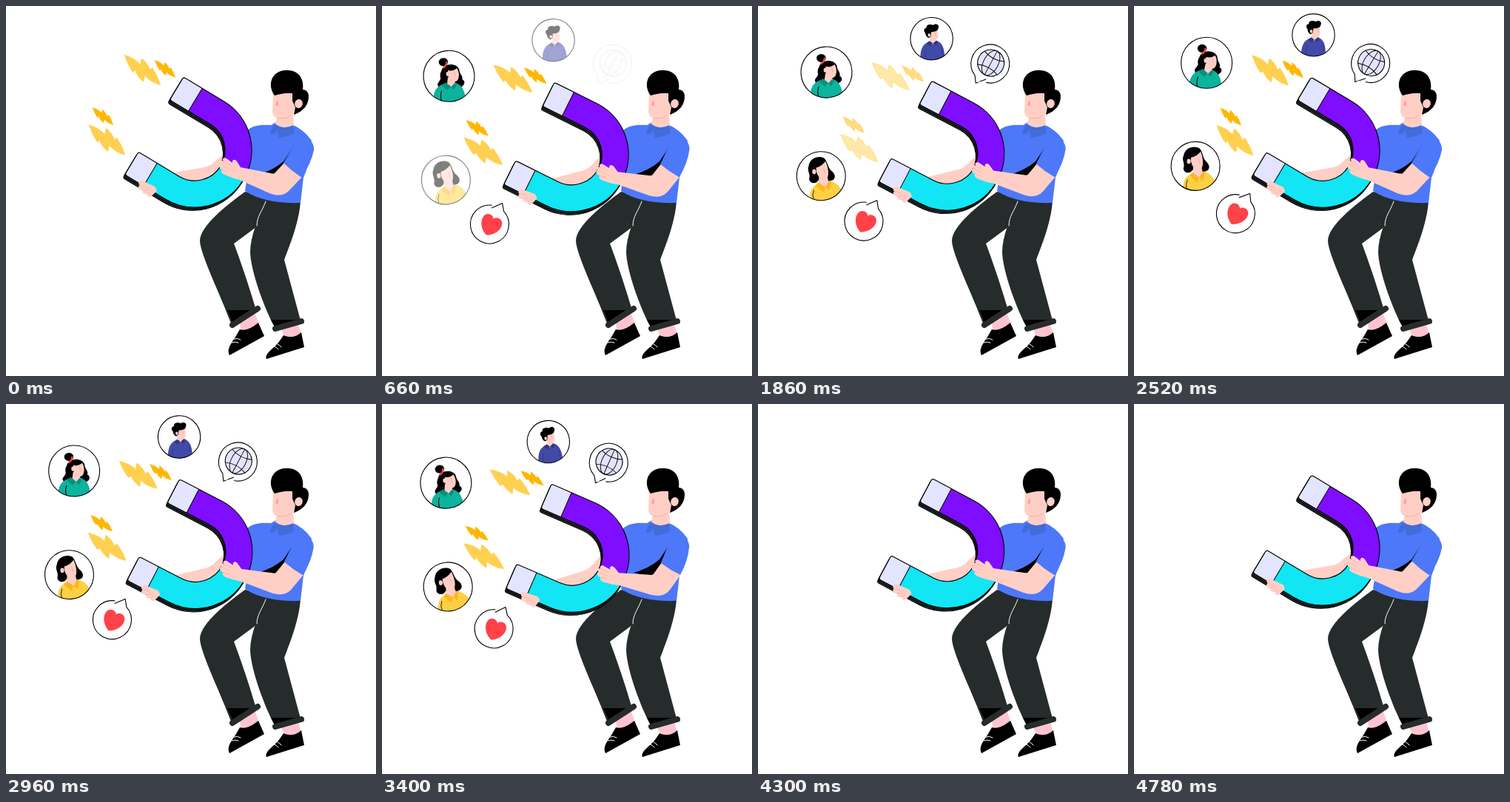
An HTML page with a canvas that plays this animation: 500x500 px, repeating every 4.8 s.

```html
<!DOCTYPE html>
<html lang="en">
<head>
<meta charset="utf-8">
<title>Magnet</title>
<style>
html, body { margin: 0; width: 100%; height: 100%; overflow: hidden; background: #fff; }
canvas { display: block; width: 100vw; height: 100vh; }
</style>
</head>
<body>
<canvas id="stage" width="500" height="500"></canvas>
<script>
const ctx = document.getElementById('stage').getContext('2d');
const LOOP = 4800, SWAY = 2400, TILT = -0.14;
const SKIN = '#ffcfc6', CORAL = '#ff9d8f', DARK = '#252c2b', BLUE = '#4c78f9';
const UPPER = [242, 100], LOWER = [180, 232];

const clamp = v => Math.max(0, Math.min(1, v));
const ramp = (t, start, length) => clamp((t - start) / length);
const ease = k => (1 - Math.cos(Math.PI * k)) / 2;

function fill(d, color) {
  ctx.fillStyle = color;
  ctx.fill(new Path2D(d));
}
function line(d, color = '#000', width = 1) {
  ctx.strokeStyle = color;
  ctx.lineWidth = width;
  ctx.stroke(new Path2D(d));
}
function oval(x, y, rx, ry, color, angle = 0) {
  ctx.beginPath();
  ctx.ellipse(x, y, rx, ry, angle, 0, 2 * Math.PI);
  ctx.fillStyle = color;
  ctx.fill();
}
function ring(x, y, rx, ry = rx, angle = 0, width = 1.1) {
  ctx.beginPath();
  ctx.ellipse(x, y, rx, ry, angle, 0, 2 * Math.PI);
  ctx.strokeStyle = '#000';
  ctx.lineWidth = width;
  ctx.stroke();
}
function group(draw) {
  ctx.save();
  draw();
  ctx.restore();
}
function spin(x, y, angle, draw) {
  group(() => {
    ctx.translate(x, y);
    ctx.rotate(angle);
    ctx.translate(-x, -y);
    draw();
  });
}
function zoom([x, y], scale, draw) {
  group(() => {
    ctx.translate(x, y);
    ctx.scale(scale, scale);
    ctx.translate(-x, -y);
    draw();
  });
}

// Round portraits
function portrait(x, y, r, draw) {
  oval(x, y, r, r, '#fff');
  group(() => {
    ctx.beginPath();
    ctx.arc(x, y, r, 0, 2 * Math.PI);
    ctx.clip();
    draw();
  });
  ring(x, y, r);
}
function bunWoman() {
  oval(92.5, 56.5, 6.3, 5.5, '#000');
  fill('M89 68C92 58 110 58 113 68C113 75 118 77 116 82C121 85 118 90 115 91C112 96 106 93 104 90L91 89C88 94 82 92 83 88C80 85 86 82 87 78C86 74 87 71 89 68Z', '#000');
  fill('M74 112C75 96 79 89 90 86L107 86C116 90 118 98 119 112Z', '#0cb39d');
  fill('M97 77L95 87C98 92 103 92 106 87L106 80Z', SKIN);
  fill('M98 68C103 70 107 68 110 66C114 73 112 84 106 84C99 84 96 76 98 68Z', SKIN);
  fill('M93 84L88 88L95 95L100 90ZM105 86L100 91L104 95L108 88Z', '#078f7f');
  oval(97, 73, 2.2, 3, SKIN);
  line('M106 70L107 76', CORAL, .7);
  line('M92 64Q96 62 97 57', '#ff4248', 2.4);
  line('M87 95Q84 101 86 109', '#000', 1.1);
}
function shortHairMan() {
  fill('M226 70C226 53 230 46 239 43L249 42C258 45 260 55 259 70Z', '#424aa8');
  fill('M241 36L240 44C243 48 248 47 250 43L249 36Z', SKIN);
  fill('M240 28L252 28L252 38C250 42 243 41 241 37Z', SKIN);
  fill('M235 31C232 27 234 24 237 24C236 19 244 19 246 21C250 18 255 21 253 25C252 30 247 30 243 30L242 36L239 38C236 36 235 34 235 31Z', '#000');
  oval(240, 34, 1.8, 2.2, SKIN);
  line('M248 31L249 35', CORAL, .7);
  fill('M240 42L236 45L241 49L244 45ZM249 42L244 46L249 48L251 43Z', '#2f367f');
  line('M234 53Q232 59 233 64M256 53L256 60', '#2f367f', .8);
}
function bobWoman() {
  fill('M67 201C69 190 82 187 89 192C94 199 92 205 99 211C104 217 101 223 94 223C86 224 82 220 79 221C74 228 65 223 67 217C69 212 64 207 67 201Z', '#000');
  fill('M66 252C65 236 69 229 78 226L95 223C107 227 111 236 112 252Z', '#ffd044');
  fill('M80 216L79 227C83 233 90 232 93 225L91 216Z', SKIN);
  fill('M77 204C82 203 87 200 90 196C94 206 95 220 87 221C80 220 76 212 77 204Z', SKIN);
  oval(74, 209, 2.6, 3.4, SKIN);
  line('M87 205L89 212', CORAL, .8);
  fill('M79 224L75 228L85 238L88 231ZM93 223L88 231L93 236L96 225Z', '#ffb61c');
  line('M72 234Q69 240 71 247', '#000', .8);
}

// Speech bubbles
function heartBubble() {
  const outline = 'M142 254.5A26 26 0 1 0 157.5 264L156.5 253L142 258';
  fill(outline, '#fff');
  line(outline, '#000', 1.1);
  group(() => {
    ctx.translate(138.5, 281);
    ctx.rotate(.5);
    fill('M0 15C-7 12 -14 5 -14 -4C-14 -14 -3 -15 0 -9C3 -15 14 -14 14 -4C14 5 7 12 0 15Z', '#ff4248');
  });
}
function globeBubble() {
  const outline = 'M298.5 92A26 26 0 1 1 313 102.5M298.5 92L299 102.5L313 98';
  oval(320, 77.5, 26, 26, '#fff');
  fill('M297 90L299 102.5L313 98Z', '#fff');
  line(outline, '#000', 1.1);
  line('M313 102.5L302 101', '#fff', .8);
  const x = 321, y = 76.5, r = 18;
  oval(x, y, r, r, '#e3e4ff');
  spin(x, y, .55, () => {
    ring(x, y, r);
    ring(x, y, 10, r, 0, .9);
    line(`M${x} ${y - r}V${y + r}`, '#000', .9);
    line(`M${x - 15} ${y - 10}Q${x} ${y - 4} ${x + 15} ${y - 10}M${x - 15} ${y + 10}Q${x} ${y + 4} ${x + 15} ${y + 10}`, '#000', .9);
  });
}

const icons = [
  { x: 98.5, y: 76, r: 34.5, enter: 200, leave: 3850, goal: UPPER, draw: () => portrait(98.5, 76, 34.5, bunWoman) },
  { x: 137.5, y: 280, r: 26, enter: 200, leave: 3850, goal: LOWER, draw: heartBubble },
  { x: 243, y: 39, r: 28.7, enter: 460, leave: 3930, goal: UPPER, draw: () => portrait(243, 39, 28.7, shortHairMan) },
  { x: 83, y: 215.5, r: 33, enter: 460, leave: 3930, goal: LOWER, draw: () => portrait(83, 215.5, 33, bobWoman) },
  { x: 320, y: 77.5, r: 26, enter: 640, leave: 3900, goal: UPPER, draw: globeBubble }
];
function drawIcon(icon, t) {
  const alpha = ramp(t, icon.enter, 400);
  const scale = 1 - ease(ramp(t, icon.leave, 390));
  if (!alpha || scale < .005) return;
  zoom(icon.goal, scale, () => {
    icon.draw();
    // A white veil fades the whole icon evenly.
    if (alpha < 1) oval(icon.x, icon.y, icon.r + 8, icon.r + 8, `rgba(255,255,255,${1 - alpha})`);
  });
}

function bolt(x, y, size, color) {
  group(() => {
    ctx.translate(x, y);
    ctx.scale(size, size);
    const d = 'M-24 -20Q-10 -16 -3 -7L-1 -15.5Q7 -9 10 0L13 -3Q20 7 24 20Q10 16 3 7L1 15.5Q-7 9 -10 0L-13 3Q-20 -7 -24 -20Z';
    fill(d, color);
    line(d, color, 1);
  });
}
function bolts(t) {
  const scale = 1 - ease(ramp(t, 3720, 400));
  if (scale < .005) return;
  const dip = clamp(1 - Math.abs(t - 1800) / 500);
  group(() => {
    ctx.globalAlpha = 1 - .52 * ease(dip);
    zoom([242, 115], scale, () => {
      bolt(184.5, 86.5, 1, '#ffd050');
      bolt(215, 85, .57, '#ffb600');
    });
    zoom([176, 206], scale, () => {
      bolt(136.5, 181, 1, '#ffd050');
      bolt(131, 149, .57, '#ffb600');
    });
  });
}

// Magnet axes: origin at the bend's centre, legs running towards -x.
const OUT = 77, IN = 41, LEG = 64, CAP = 34.5;
function magnetPath() {
  return `M${3 - LEG} ${-OUT}H0A${OUT} ${OUT} 0 0 1 0 ${OUT}H${3 - LEG}Q${-LEG} ${OUT} ${-LEG} ${OUT - 3}V${IN + 3}Q${-LEG} ${IN} ${3 - LEG} ${IN}H0A${IN} ${IN} 0 0 0 0 ${-IN}H${3 - LEG}Q${-LEG} ${-IN} ${-LEG} ${-IN - 3}V${3 - OUT}Q${-LEG} ${-OUT} ${3 - LEG} ${-OUT}Z`;
}
function magnet() {
  group(() => {
    ctx.translate(255, 195);
    ctx.rotate(.541);
    const body = magnetPath();
    for (const depth of [5, 2.5]) {
      group(() => {
        ctx.translate(0, depth);
        fill(body, DARK);
        line(body);
      });
    }
    group(() => {
      ctx.clip(new Path2D(body));
      ctx.fillStyle = '#7f0dff';
      ctx.fillRect(-CAP, -OUT, 120, OUT);
      ctx.fillStyle = '#12e5f3';
      ctx.fillRect(-CAP, 0, 120, OUT);
      ctx.fillStyle = '#e3e4ff';
      ctx.fillRect(-LEG, -OUT, LEG - CAP, 2 * OUT);
      line(`M${-CAP} ${-OUT}V${OUT}M${IN} 0H${OUT}`);
    });
    line(body, '#000', 1.2);
  });
}
function backArm() {
  fill('M227 225L268 218Q276 216 280 212L292 202L298 226L260 246L232 240Z', SKIN);
}
function backHand() {
  line('M183 239.5L199 247M182.5 245L199 249M188 250.5L199 249M194 254.5L200 249', SKIN, 7);
  line('M182 242L190 246M184 248.5L192 249M190 254L195 251', CORAL, .5);
}

function frontArm() {
  fill('M376 212L363 226Q361 227 358 226L317 218L312 210C309 206 305 208 306 212L298 206C294 204 291 207 294 210C290 207 287 210 290 213C286 215 288 219 292 221C289 224 293 227 298 229Q306 233 316 235L356 253C367 257 376 257 384 248L400 231Z', SKIN);
  line('M294 210L303 215M291 214L301 220M292 221L300 224', CORAL, .5);
  fill('M389 188L375 212Q386 223 399 231.5Q412 214 416 195C417 186 411 180 403 176Z', BLUE);
}

function legs() {
  fill('M315 424L337 416L342 431L318 441ZM372 437L395 430L399 444L377 449Z', '#ffc4d0');
  fill('M316 437C323 440 334 434 341 428L349 446L302 472C298 465 303 457 309 449Z', '#000');
  fill('M375 445C384 449 393 447 399 441L403 461L352 477C349 470 361 463 368 455Z', '#000');
  line('M308 450Q313 448 317 451M305 455Q310 453 314 455M367 457Q370 458 372 461M362 460Q366 461 368 464', '#fff', 1);
  fill('M323 251C300 268 263 296 262 317C262 335 292 395 304 429L337 408C329 380 317 345 308 321L350 290L398 265Z', DARK);
  fill('M299 411L330 411L306 427Z', '#000');
  line('M306 431L340 409', DARK, 8);
  fill('M351 263C342 285 330 310 330 333C331 360 350 410 363 434L398 425L376 343C384 322 396 292 398 264Z', DARK);
  fill('M358 424L397 424L364 435Z', '#000');
  line('M364 436L399 426', DARK, 8);
  line('M351 264C346 278 339 284 339 297', '#fff', 1);
}
function torso() {
  fill('M326 168C333 162 342 160 358 161L365 157L388 161C400 166 408 175 413 182L406 222L402 232L398 266C372 267 342 263 323 250L328 215Z', BLUE);
  fill('M389 189L375 210Q361 222 340 228L362 233L386 228Z', '#000');
}
function head() {
  fill('M366 148L364 160Q375 168 389 162L388 143Z', SKIN);
  fill('M361 119L360 143C360 149 365 152 372 152C381 151 389 147 391 140L396 124L388 116Z', SKIN);
  line('M367 151.5Q378 153 385 148', '#ffa99d', 1);
  fill('M363 121C356 112 356 99 364 92C372 85 388 85 396 93C401 99 402 106 401 113C406 113 409 117 409 122C409 134 402 142 389 147L391 137L387 128L387 118C378 117 370 119 363 121Z', '#000');
  oval(395.5, 132, 5.3, 6, SKIN, .3);
  fill('M367 126L364 134L368 135Z', CORAL);
  fill('M363 159L356 173L361 174L367 168L369 178C378 177 385 175 390 171L388 161Q375 168 363 159Z', '#426cd8');
}

function render(now) {
  const t = now % LOOP;
  const sway = TILT * (1 - Math.cos(2 * Math.PI * t / SWAY)) / 2;
  ctx.fillStyle = '#fff';
  ctx.fillRect(0, 0, 500, 500);
  ctx.lineCap = ctx.lineJoin = 'round';
  legs();
  torso();
  head();
  spin(326, 184, sway, () => {
    icons.forEach(icon => drawIcon(icon, t));
    bolts(t);
    backArm();
    magnet();
    backHand();
  });
  spin(396, 200, sway, frontArm);
}

const start = performance.now();
function tick() {
  render(performance.now() - start);
  requestAnimationFrame(tick);
}
tick();
</script>
</body>
</html>
```
